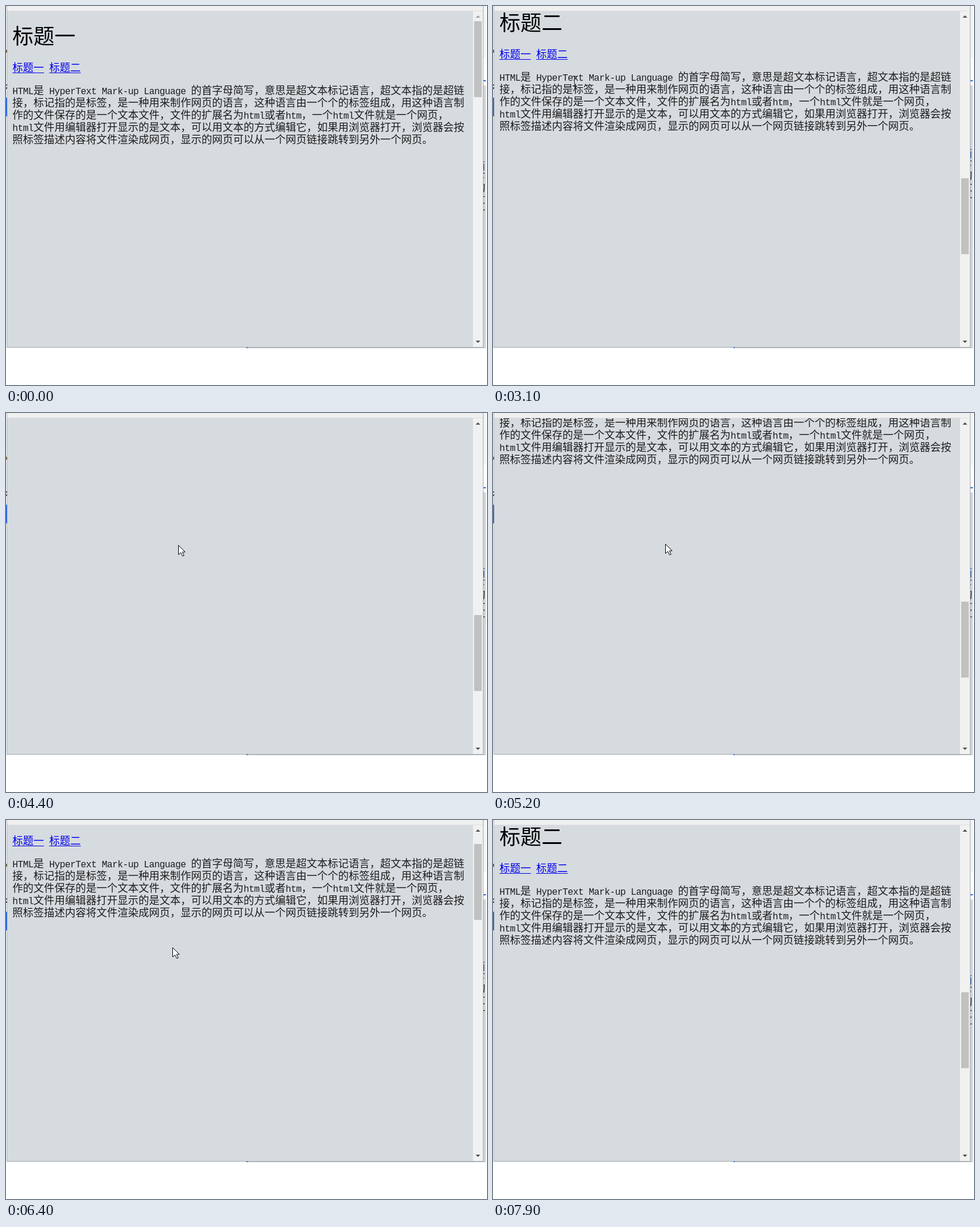
Write an HTML page with a canvas that moves like this. It is 824 px wide and 649 px high and loops after 8000 ms.

```html
<!DOCTYPE html>
<html lang="zh-CN">
<head>
<meta charset="utf-8">
<title>标题一</title>
<style>
html, body { margin: 0; width: 100%; height: 100%; overflow: hidden; background: #fff; }
canvas { display: block; }
</style>
</head>
<body>
<canvas id="stage" width="824" height="649"></canvas>
<script>
const ctx = document.getElementById('stage').getContext('2d');
const LOOP = 8000, STEP = 100;
const SECTION = 1168, JUMP = 1191, MAX_SCROLL = 1818;
const CLICK_TWO = 2600, CLICK_AGAIN = 7500;
const CJK = '"Noto Sans CJK SC", "Noto Sans CJK", sans-serif';
const MONO = '"Liberation Mono", "Noto Sans Mono", monospace';
const INK = '#1c1c1c', LINK = '#0000ee', BLUE = '#2f6be0';
const LINES = [
  'HTML是 HyperText Mark-up Language 的首字母简写，意思是超文本标记语言，超文本指的是超链',
  '接，标记指的是标签，是一种用来制作网页的语言，这种语言由一个个的标签组成，用这种语言制',
  '作的文件保存的是一个文本文件，文件的扩展名为html或者htm，一个html文件就是一个网页，',
  'html文件用编辑器打开显示的是文本，可以用文本的方式编辑它，如果用浏览器打开，浏览器会按',
  '照标签描述内容将文件渲染成网页，显示的网页可以从一个网页链接跳转到另外一个网页。'
];

const progress = (t, from, to) => Math.min(1, Math.max(0, (t - from) / (to - from)));
const bump = (t, center, half, height) => height * Math.max(0, 1 - Math.abs(t - center) / half);

function scrollAt(t) {
  if (t < CLICK_TWO) return 0;
  if (t >= CLICK_AGAIN) return JUMP;
  let y = JUMP;
  const wheel = (from, to, target) => { y += (target - y) * progress(t, from, to); };
  wheel(3100, 3700, 916);
  wheel(3900, 4800, MAX_SCROLL);
  wheel(4800, 5200, 1317);
  wheel(5200, 5700, 888);
  wheel(5700, 6400, 70);
  wheel(6400, 6500, 0);
  return Math.round(y);
}

function pointerAt(t) {
  let x = 769, y = 62;
  const move = (from, to, tx, ty, power = 1) => {
    const k = progress(t, from, to) ** power;
    x += (tx - x) * k;
    y += (ty - y) * k;
  };
  move(300, 1100, 184, 151);
  move(1500, 2400, 118, 121);
  move(2500, 2600, 108, 108);
  move(3000, 3600, 295, 228);
  move(3800, 5200, 295, 224);
  move(5200, 6500, 283, 217, 2);
  move(6600, 7300, 104, 103);
  move(7500, 7900, 394, 178);
  return [Math.round(x), Math.round(y)];
}

// Vertical shift of the page seen behind the window.
function shiftAt(t) {
  const rest = t >= 6400 && t < CLICK_AGAIN ? -23 : 0;
  return Math.round(rest + bump(t, 1400, 300, -148) + bump(t, 2100, 500, 172) + bump(t, 3700, 700, -148));
}

function rect(color, x, y, w, h) {
  ctx.fillStyle = color;
  ctx.fillRect(x, y, w, h);
}

function clipped(x, y, w, h, draw) {
  ctx.save();
  ctx.beginPath();
  ctx.rect(x, y, w, h);
  ctx.clip();
  draw();
  ctx.restore();
}

// Character grid: 18 px for full-width, 9 px for Latin.
function textLine(text, x, y) {
  for (const char of text) {
    const latin = char < '\x80';
    ctx.font = latin ? '16px ' + MONO : '300 18px ' + CJK;
    ctx.fillText(char, x, y);
    x += latin ? 9 : 18;
  }
}

function section(title, y) {
  if (y > 585 || y < -250) return;
  ctx.fillStyle = '#000';
  ctx.font = '500 36px ' + CJK;
  ctx.fillText(title, 11, y + 65);
  ['标题一', '标题二'].forEach((label, i) => {
    const x = 11 + i * 63;
    ctx.fillStyle = LINK;
    textLine(label, x, y + 112);
    ctx.fillRect(x, y + 114, 54, 1);
  });
  ctx.fillStyle = INK;
  LINES.forEach((line, i) => textLine(line, 11, y + 151 + i * 21));
}

function backdrop(shift) {
  rect('#fff', 0, 0, 824, 649);
  rect('#f1f2f4', 817, 0, 5, 89);
  rect(BLUE, 817, 127, 5, 2);
  rect('#d0d3d9', 817, 136, 5, 450);
  clipped(817, 138, 5, 448, () => {
    ctx.font = '300 17px ' + CJK;
    [...'而下切文一'].forEach((char, i) => {
      ctx.fillStyle = i ? INK : '#2458a0';
      ctx.fillText(char, 804, 280 + i * 19 + shift);
    });
  });
  rect('#bfc3c8', 414, 585, 408, 1);
}

function leftEdge() {
  rect('#6b6a3a', 0, 75, 2, 5);
  rect(BLUE, 0, 157, 2, 32);
  clipped(0, 130, 2, 20, () => {
    ctx.fillStyle = INK;
    ctx.font = '300 18px ' + CJK;
    ctx.fillText('行', -1, 147);
  });
}

function arrowHead(y, dir, active) {
  ctx.fillStyle = active ? '#505050' : '#a3a3a3';
  ctx.beginPath();
  ctx.moveTo(804.5, y - 2 * dir);
  ctx.lineTo(812.5, y - 2 * dir);
  ctx.lineTo(808.5, y + 2 * dir);
  ctx.fill();
}

function browser(scroll) {
  rect('#d6dbdf', 1, 9, 799, 575);
  clipped(2, 9, 798, 575, () => {
    section('标题一', -scroll);
    section('标题二', SECTION - scroll);
  });
  rect('#f1f1f1', 800, 9, 17, 575);
  rect('#c1c1c1', 802, 26 + Math.floor(scroll * 0.226), 13, 130);
  arrowHead(18, -1, scroll > 0);
  arrowHead(575, 1, scroll < MAX_SCROLL);

  rect('#f0f0f1', 1, 0, 816, 8);
  rect('#dcdee0', 1, 8, 816, 1);
  rect('#b4b8bc', 1, 0, 1, 585);
  rect('#a8abae', 817, 0, 1, 585);
  rect('#a2a6aa', 1, 584, 817, 1);
  rect(BLUE, 412, 584, 2, 2);
}

function outline(path) {
  ctx.fillStyle = '#fff';
  ctx.strokeStyle = '#000';
  ctx.lineWidth = 1;
  ctx.fill(path);
  ctx.stroke(path);
}

const ARROW = new Path2D('M0 0V16L4 12.5L7 18.5L9.5 17.5L6.8 11.5H11.5Z');
const HAND = new Path2D('M-1 0H1L2 2V6L8 7L10 9V13L8 18H0L-5 11V9L-2 10V2Z');

function pointer(x, y, scroll) {
  const row = (y + scroll) % SECTION;
  const onLink = row > 96 && row < 116 && (x > 10 && x < 65 || x > 73 && x < 128);
  const onText = row > 136 && row < 241 && x > 10 && x < 786;
  ctx.save();
  ctx.translate(x, y);
  if (onText && !onLink) {
    rect('#333', 0, -7, 1, 15);
    rect('#333', -3, -8, 7, 1);
    rect('#333', -3, 8, 7, 1);
  } else {
    ctx.translate(0.5, 0.5);
    outline(onLink ? HAND : ARROW);
  }
  ctx.restore();
}

const start = performance.now();
function draw() {
  const t = Math.floor((performance.now() - start) % LOOP / STEP) * STEP;
  const scroll = scrollAt(t);
  backdrop(shiftAt(t));
  browser(scroll);
  leftEdge();
  if (t >= 300) pointer(...pointerAt(t), scroll);
  requestAnimationFrame(draw);
}
draw();
</script>
</body>
</html>
```
